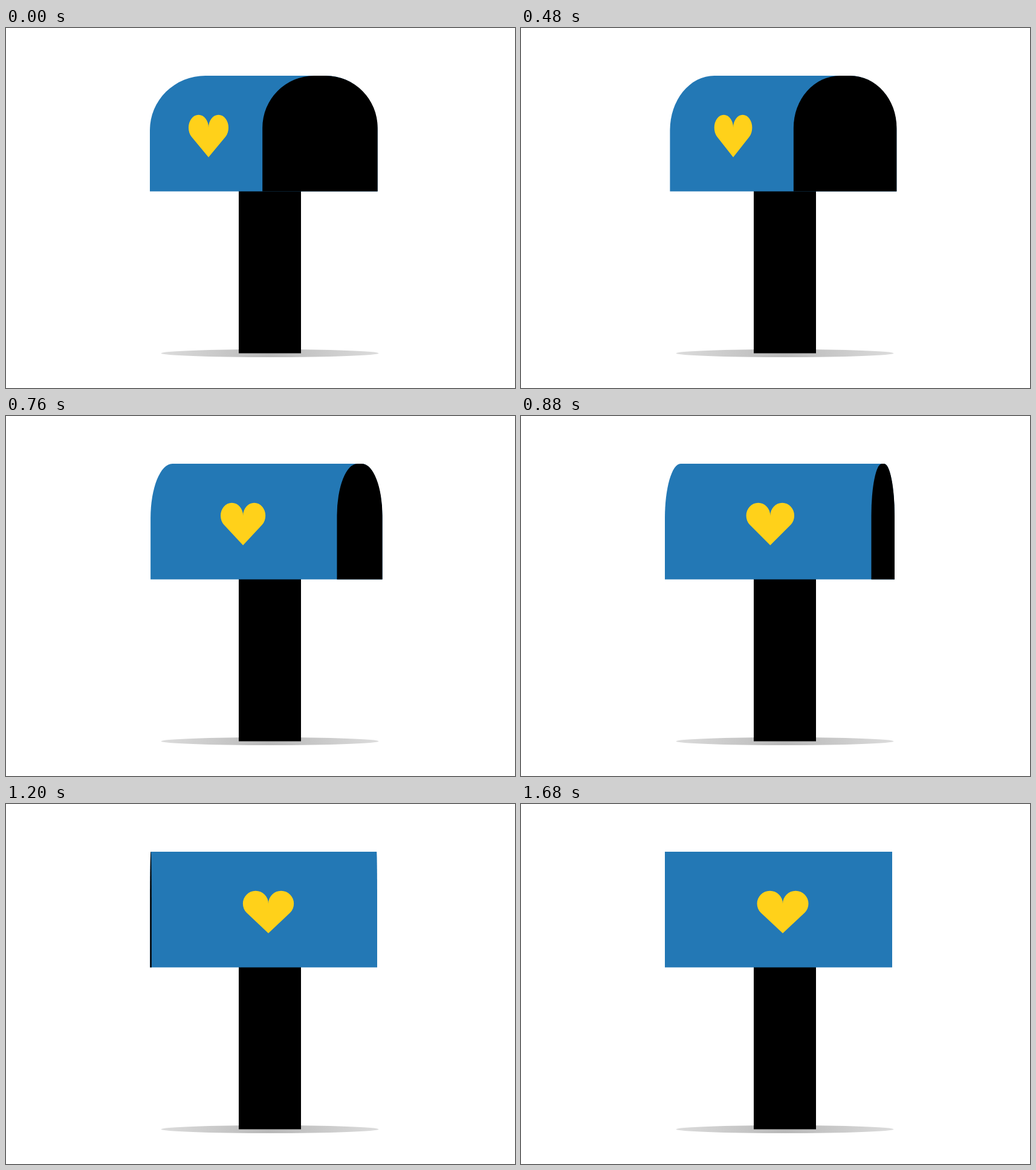
An HTML page with a canvas for the animation above (2.32 s loop, 842 px wide and 596 px high).

```html
<!DOCTYPE html>
<html lang="en">
<head>
<meta charset="utf-8">
<title>Turning mailbox</title>
<style>
  html, body { margin: 0; width: 100%; height: 100%; overflow: hidden; background: #fff; }
  canvas { display: block; }
</style>
</head>
<body>
<canvas id="stage" width="842" height="596"></canvas>
<script>
const ctx = document.getElementById('stage').getContext('2d');
const LOOP = 2320, STEP = 40, TOP = 79, BOTTOM = 270.6;
const BLUE = '#2378b5', YELLOW = '#ffd11a';

// Key poses; opening is the signed width of the dark end (negative: seen on the left).
const times = [0, 320, 640, 880, 1200, 1520, 1680];
const tracks = {
  left:       [238, 250, 241, 238, 238.3, 237.5, 238],
  right:      [614.7, 615, 626, 618, 614, 614, 614],
  opening:    [190.5, 209.5, 116, 38.5, -2.5, -14, 0],
  backRadius: [92, 95, 48, 26, 1, 0, 0],
  heartX:     [335, 338, 371, 412.3, 434, 440.3, 433],
  heartWidth: [66, 59.5, 68.5, 79.5, 84.3, 80.7, 85]
};

// Smooth curve through the key values, at rest at both ends.
function sample(values, t) {
  const last = times.length - 1;
  if (t >= times[last]) return values[last];
  const span = i => times[i + 1] - times[i];
  const rate = i => (values[i + 1] - values[i]) / span(i);
  const slope = i => i === 0 || i === last ? 0
    : (rate(i - 1) * span(i) + rate(i) * span(i - 1)) / (span(i) + span(i - 1));
  const i = times.findIndex(k => k > t) - 1;
  const h = span(i), u = (t - times[i]) / h, v = 1 - u;
  return values[i] * (1 + 2 * u) * v * v + slope(i) * h * u * v * v
    + values[i + 1] * u * u * (3 - 2 * u) - slope(i + 1) * h * u * u * v;
}

function arch(x0, x1, radiusL, radiusR, height, color) {
  ctx.fillStyle = color;
  ctx.beginPath();
  ctx.moveTo(x0, BOTTOM);
  ctx.ellipse(x0 + radiusL, TOP + height, radiusL, height, 0, Math.PI, 1.5 * Math.PI);
  ctx.ellipse(x1 - radiusR, TOP + height, radiusR, height, 0, 1.5 * Math.PI, 2 * Math.PI);
  ctx.lineTo(x1, BOTTOM);
  ctx.fill();
}

function heart(x, width) {
  const r = 21.25;
  ctx.save();
  ctx.translate(x, 165);
  ctx.scale(width / 85, 1);
  ctx.fillStyle = YELLOW;
  ctx.beginPath();
  ctx.moveTo(0, 49);
  ctx.arc(-r, 0, r, 0.75 * Math.PI, 2 * Math.PI);
  ctx.arc(r, 0, r, Math.PI, 2.25 * Math.PI);
  ctx.fill();
  ctx.restore();
}

function shadow() {
  const fade = ctx.createRadialGradient(436.5, 538.5, 0, 436.5, 538.5, 180);
  fade.addColorStop(0, '#b8b8b8');
  fade.addColorStop(1, '#dcdcdc');
  ctx.fillStyle = fade;
  ctx.beginPath();
  ctx.ellipse(436.5, 538.5, 180, 6.5, 0, 0, 2 * Math.PI);
  ctx.fill();
}

function draw(t) {
  const pose = {};
  for (const name in tracks) pose[name] = sample(tracks[name], t);
  const { left, right, opening, heartX, heartWidth } = pose;
  const width = Math.abs(opening), endRadius = 0.45 * width;

  ctx.clearRect(0, 0, 842, 596);
  shadow();
  ctx.fillStyle = '#000';
  ctx.fillRect(385, 270, 103, 268.5);

  if (opening > 0) {
    arch(left, right, Math.max(0, pose.backRadius), Math.min(85, endRadius), 90, BLUE);
    arch(right - width, right, endRadius, endRadius, 86, '#000');
  } else {
    arch(left, right, width / 2, 0.36 * width, 80, BLUE);
    if (width > 0.1) arch(left, left + width, endRadius, endRadius, 86, '#000');
  }
  heart(heartX, heartWidth);
}

function tick() {
  const t = performance.now() % LOOP;
  draw(Math.floor(t / STEP) * STEP);
  requestAnimationFrame(tick);
}
tick();
</script>
</body>
</html>
```
